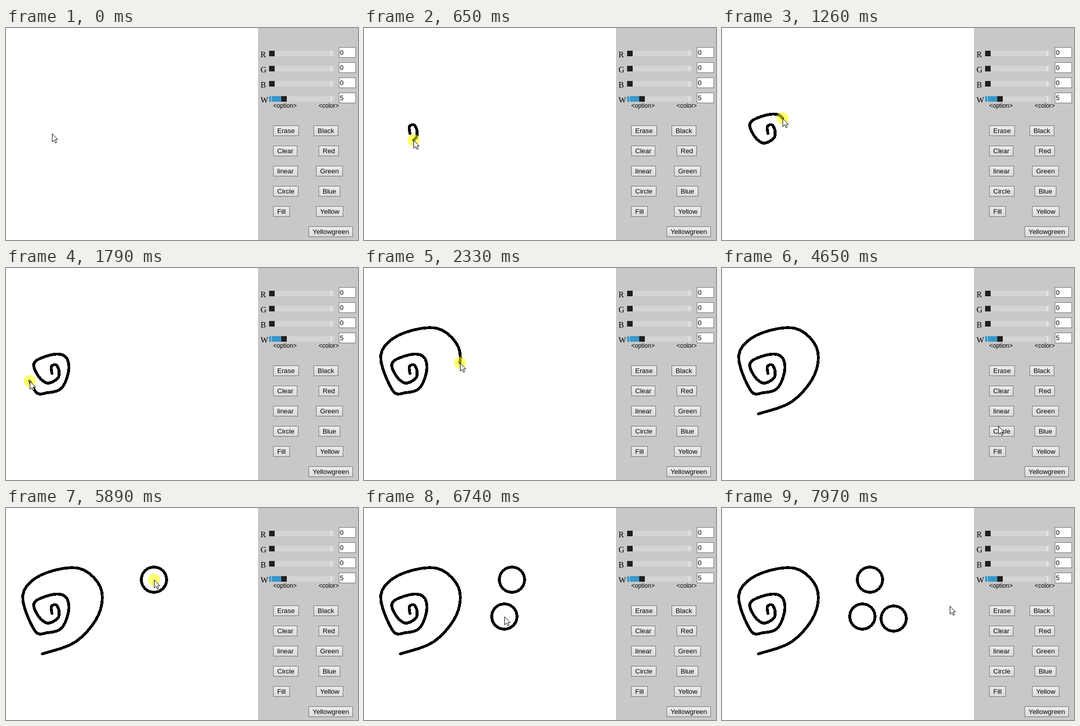
An HTML page for the animation above (8 s loop, 697 by 420 pixels).

```html
<!DOCTYPE html>
<html lang="en">
<head>
<meta charset="utf-8">
<title>Paint board</title>
<style>
  html, body { margin: 0; width: 100%; height: 100%; overflow: hidden; background: #fff; }
  svg { display: block; }
  text { font: 13.333px "Liberation Sans", Arial, sans-serif; white-space: pre; }
  .label { font: 16px "Liberation Serif", Times, serif; }
  .small { font-size: 12px; }
  .button rect { fill: url(#face); stroke: #707070; }
  .button.hover rect { fill: #a6f4ff; stroke: #2a8dd4; }
  .ink { fill: none; stroke: #000; stroke-width: 5.6; stroke-linecap: round;
         stroke-linejoin: round; shape-rendering: crispEdges; }
</style>
</head>
<body>
<svg width="697" height="420" viewBox="0 0 697 420">
  <defs>
    <linearGradient id="face" x2="0" y2="1">
      <stop stop-color="#ececec"/><stop offset="1" stop-color="#dadada"/>
    </linearGradient>
  </defs>
  <rect x="499" width="198" height="420" fill="#c8c8c8"/>
  <g id="panel"></g>
  <polyline id="spiral" class="ink"/>
  <g id="rings"></g>
  <g id="pointer">
    <circle id="glow" r="12" fill="#ff0" fill-opacity=".55"/>
    <path d="M.5 .5V16.5L4.3 13L6.9 18.6L9.3 17.5L6.8 12H11.5Z" fill="#fff" stroke="#000"/>
  </g>
</svg>
<script>
// The screen updates in ticks; all times below are counted in them
const LOOP = 8000, TICK = 77.3, FIRST = 73, DRAW_TICKS = 33;
const $ = id => document.getElementById(id);

// Hand-drawn spiral, passed at even time steps
const spiral = [
  [91, 209], [90, 195], [99, 192], [105, 204], [102, 219], [81, 228], [62, 211],
  [57, 186], [95, 171], [119, 177], [124, 204], [110, 238], [82, 247], [57, 243],
  [33, 174], [69, 133], [143, 119], [187, 157], [183, 212], [138, 265], [72, 289]
];
// Pointer moves after drawing: start, duration, x, y
const moves = [
  [39, 3, 440, 271], [46, 6, 540, 284], [56, 3, 547, 313], [67, 4, 293, 142],
  [79, 3, 278, 215], [91, 3, 340, 219], [101, 1, 451, 194]
];
// Mouse presses: start, duration
const presses = [[0, 34], [63, 2], [75, 1], [84, 2], [97, 2]];

const left = ["Erase", "Clear", "linear", "Circle", "Fill"].map(s => [s, 529]);
const right = [["Black", 609], ["Red", 619], ["Green", 614], ["Blue", 619], ["Yellow", 614], ["Yellowgreen", 599]];

const rect = (x, y, w, h, fill) => `<rect x="${x}" y="${y}" width="${w}" height="${h}" fill="${fill}"/>`;
const text = (x, y, s, cls = "") =>
  `<text x="${x}" y="${y}" class="${cls}">${s.replace(/</g, "&lt;")}</text>`;
const frame = (x, y, w) =>
  `<rect x="${x + .5}" y="${y + .5}" width="${w - 1}" height="20" fill="#fff" stroke="#707070"/>`;
const button = ([s, x], row) =>
  `<g class="button">${frame(x, 193 + 40 * row, 40)}${text(x + 8, 208 + 40 * row, s)}</g>`;

function slider(name, i) {
  const y = 45 + 30 * i, wide = name === "W", thumb = wide ? 545 : 521;
  return text(504, y + 13, name, "label")
    + rect(521, y, 129, 11, "#d4d4d4") + rect(643, y, 2, 11, "#ededed")
    + (wide ? rect(521, y, 24, 11, "#3a97c9") + rect(525, y, 1, 11, "#c5e0ee") : "")
    + rect(thumb, y, 11, 11, "#1f1f1f")
    + frame(659, y - 7, 34) + text(661, y + 8, wide ? "5" : "0");
}

// Catmull-Rom curve through the spiral points
function curve(u) {
  const i = Math.min(Math.floor(u), spiral.length - 2), p = u - i;
  const at = k => spiral[Math.max(0, Math.min(spiral.length - 1, k))];
  return [0, 1].map(j => {
    const [a, b, c, d] = [-1, 0, 1, 2].map(k => at(i + k)[j]);
    return b + p * (c - a + p * (2 * a - 5 * b + 4 * c - d + p * (3 * (b - c) + d - a))) / 2;
  });
}

const clamp = v => Math.max(0, Math.min(1, v));
const progress = tick => clamp(tick / DRAW_TICKS) * (spiral.length - 1);

function pointer(tick) {
  return moves.reduce((from, [start, span, ...to]) => {
    const p = clamp((tick - start) / span), e = p * p * (3 - 2 * p);
    return from.map((v, j) => v + (to[j] - v) * e);
  }, curve(progress(tick))).map(Math.round);
}

// Each press on the board after the spiral leaves a ring
const rings = presses.slice(1).map(([start]) => [start, ...pointer(start)]).filter(r => r[1] < 499);

$("panel").innerHTML = [..."RGBW"].map(slider).join("")
  + text(529, 158, "<option>", "small") + text(619, 158, "<color>", "small")
  + [left, right].map(column => column.map(button).join("")).join("");
$("rings").innerHTML = rings.map(([, x, y]) =>
  `<circle class="ink" cx="${x}" cy="${y}" r="25"/>`).join("");

const ringNodes = [...$("rings").children];
const buttons = [...document.querySelectorAll(".button")].map(node => {
  const [box, label] = node.children;
  box.setAttribute("width", Math.round(label.getComputedTextLength() + 15));
  return { node, area: box.getBBox() };
});

function draw(tick) {
  const pos = progress(tick), line = [];
  for (let u = 0; u < pos; u += .2) line.push(curve(u));
  if (pos > 0) line.push(curve(pos));
  $("spiral").setAttribute("points", line.join(" "));

  const [x, y] = pointer(tick);
  $("pointer").setAttribute("transform", `translate(${x} ${y})`);
  const down = presses.some(([start, span]) => tick >= start && tick < start + span);
  $("glow").style.display = down ? "" : "none";

  ringNodes.forEach((node, k) => node.style.display = tick >= rings[k][0] ? "" : "none");
  for (const { node, area } of buttons) {
    const dx = x - area.x, dy = y - area.y;
    node.classList.toggle("hover", dx >= 0 && dx < area.width && dy >= 0 && dy < area.height);
  }
}

const begin = performance.now();
function animate() {
  const t = (performance.now() - begin) % LOOP;
  draw(Math.floor((t - FIRST) / TICK));
  requestAnimationFrame(animate);
}
animate();
</script>
</body>
</html>
```
